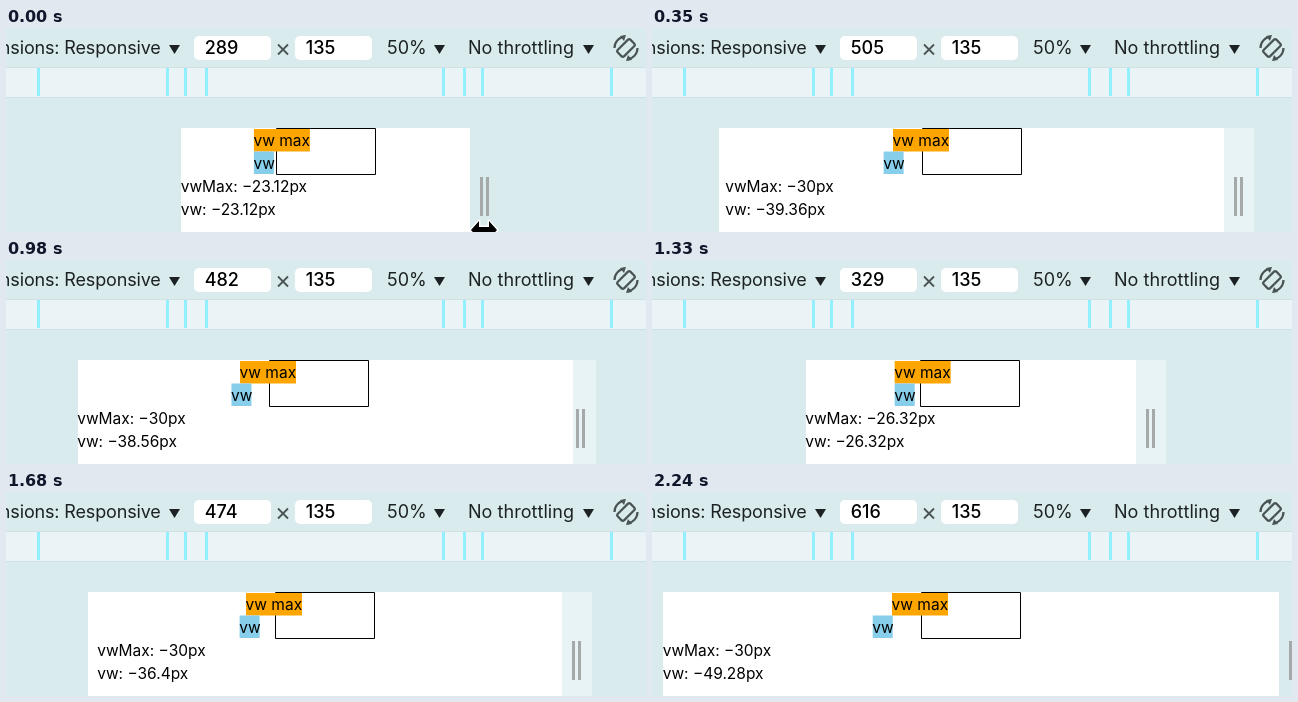
An HTML page with a canvas that plays this animation: 640x204 px, repeating every 2310 ms.

```html
<!DOCTYPE html>
<html lang="en">
<head>
<meta charset="utf-8">
<title>Responsive resize</title>
<style>
html, body { margin: 0; width: 100%; height: 100%; overflow: hidden; background: #d9ebed; }
canvas { display: block; }
</style>
</head>
<body>
<canvas id="stage" width="640" height="204"></canvas>
<script>
const ctx = document.getElementById('stage').getContext('2d');
const LOOP = 2310, STEP = 70;
const UI = '18px Inter, "Open Sans", sans-serif';
const BODY = '15.5px Inter, "Open Sans", sans-serif';

// [step, viewport width] as the handle is dragged
const drag = [[0, 289], [4, 492], [5, 505], [10, 602], [11, 602], [13, 495], [14, 482],
  [18, 330], [19, 329], [23, 455], [24, 474], [31, 616], [32, 616]];

const secant = i => (drag[i + 1][1] - drag[i][1]) / (drag[i + 1][0] - drag[i][0]);

function slope(i) {
  if (i === 0 || i === drag.length - 1) return 0;
  const a = secant(i - 1), b = secant(i);
  return a * b <= 0 ? 0 : 2 * a * b / (a + b);
}

// Monotone cubic through the drag points
function widthAt(step) {
  if (step <= 0) return drag[0][1];
  let i = 0;
  while (i < drag.length - 2 && step > drag[i + 1][0]) i++;
  const [s0, w0] = drag[i], [s1, w1] = drag[i + 1];
  const h = s1 - s0, u = (step - s0) / h, v = 1 - u;
  return Math.round(w0 * v * v * (1 + 2 * u) + w1 * u * u * (3 - 2 * u)
    + h * u * v * (v * slope(i) - u * slope(i + 1)));
}

function rect(x, y, w, h, color) {
  ctx.fillStyle = color;
  ctx.fillRect(x, y, w, h);
}

function text(str, x, y, font, align = 'left', spacing = 0) {
  ctx.font = font;
  ctx.textAlign = align;
  ctx.letterSpacing = spacing + 'px';
  ctx.fillText(str, x, y);
}

function poly(points, color) {
  ctx.fillStyle = color;
  ctx.beginPath();
  points.forEach(([x, y]) => ctx.lineTo(x, y));
  ctx.closePath();
  ctx.fill();
}

function field(x, value) {
  ctx.fillStyle = '#fff';
  ctx.beginPath();
  ctx.roundRect(x, 8, 77, 24, 5);
  ctx.fill();
  ctx.fillStyle = '#000';
  text(value, x + 10.7, 26, '500 ' + UI);
}

function rotateIcon(x, y) {
  ctx.save();
  ctx.translate(x, y);
  ctx.scale(-1, 1);
  ctx.strokeStyle = '#4a5356';
  ctx.lineWidth = 2.2;
  ctx.save();
  ctx.rotate(-Math.PI / 4);
  ctx.beginPath();
  ctx.roundRect(-4.5, -9, 9, 18, 2);
  ctx.stroke();
  ctx.restore();
  for (let k = 0; k < 2; k++) {
    ctx.beginPath();
    ctx.arc(0, 0, 11.5, -1.45, 0);
    ctx.stroke();
    poly([[0, -13], [6, -12], [2, -7]], '#4a5356');
    ctx.rotate(Math.PI);
  }
  ctx.restore();
}

function toolbar(width) {
  ctx.fillStyle = '#1c2224';
  text('ensions: Responsive', 154.7, 26, UI, 'right', -0.15);
  text('50%', 381, 26, UI);
  text('No throttling', 462, 26, UI, 'left', 0.05);
  for (const x of [163, 428, 577]) poly([[x, 17], [x + 11, 17], [x + 5.5, 26]], '#1c2224');
  field(188, width);
  field(289, 135);
  ctx.strokeStyle = '#4a5356';
  ctx.lineWidth = 1.8;
  ctx.beginPath();
  ctx.moveTo(272, 16.5); ctx.lineTo(282, 26.5);
  ctx.moveTo(282, 16.5); ctx.lineTo(272, 26.5);
  ctx.stroke();
  rotateIcon(620, 20);
}

function ruler() {
  rect(0, 39, 640, 31, '#cfe1e4');
  rect(0, 40, 640, 29, '#eaf4f6');
  for (const x of [31, 160, 178, 199, 436, 457, 475, 604]) rect(x, 40, 3, 28, '#92effd');
}

function handle(edge, active) {
  if (active) rect(edge, 100, 30, 104, '#e8f3f5');
  rect(edge + 10, 149, 3, 39, '#a5a9aa');
  rect(edge + 16, 149, 3, 39, '#a5a9aa');
}

function cursor(x, y) {
  const pts = [[-13, 0], [-5, -9], [-5, -3], [5, -3], [5, -9], [13, 0],
    [5, 9], [5, 3], [-5, 3], [-5, 9]].map(([a, b]) => [x + a, y + b]);
  ctx.strokeStyle = '#fff';
  ctx.lineWidth = 3;
  ctx.lineJoin = 'round';
  poly(pts, '#000');
  ctx.stroke();
  poly(pts, '#000');
}

function tag(str, x, y, w, color) {
  rect(x, y, w, 22.5, color);
  ctx.fillStyle = '#000';
  text(str, x - 0.4, y + 17, BODY);
}

const px = n => '\u2212' + Number(n.toFixed(2)) + 'px';

// The layout trails the drag by one step
function page(width, last) {
  const outer = Math.max(width, last), inner = Math.min(width, last);
  const left = Math.round(319.3 - outer / 2);
  const x = width < last ? left - 0.5 : left + (outer - inner) / 2;
  const boxX = Math.round(x + inner / 2 - 50);
  const vw = inner * 0.08, capped = Math.min(vw, 30);

  rect(left, 100, outer, 104, '#fff');
  ctx.strokeStyle = '#000';
  ctx.lineWidth = 1;
  ctx.strokeRect(boxX + 0.5, 100.5, 99, 46);
  tag('vw max', boxX + 1 - capped, 101, 56, '#ffa500');
  tag('vw', boxX + 1 - vw, 123.5, 20, '#87ceeb');
  text('vwMax: ' + px(capped), x - 0.3, 164, BODY);
  text('vw: ' + px(vw), x - 0.3, 187, BODY);
}

function draw(now) {
  const step = Math.floor(now % LOOP / STEP);
  const width = widthAt(step), last = widthAt(step - 1);
  const edge = Math.round(319.3 - width / 2) + width;
  rect(0, 0, 640, 204, '#d9ebed');
  ruler();
  toolbar(width);
  handle(edge, width !== last);
  page(width, last);
  if (width < last) handle(edge, false);
  if (step === 0) cursor(478, 202);
}

const start = performance.now();
function tick() {
  draw(performance.now() - start);
  requestAnimationFrame(tick);
}
tick();
</script>
</body>
</html>
```
